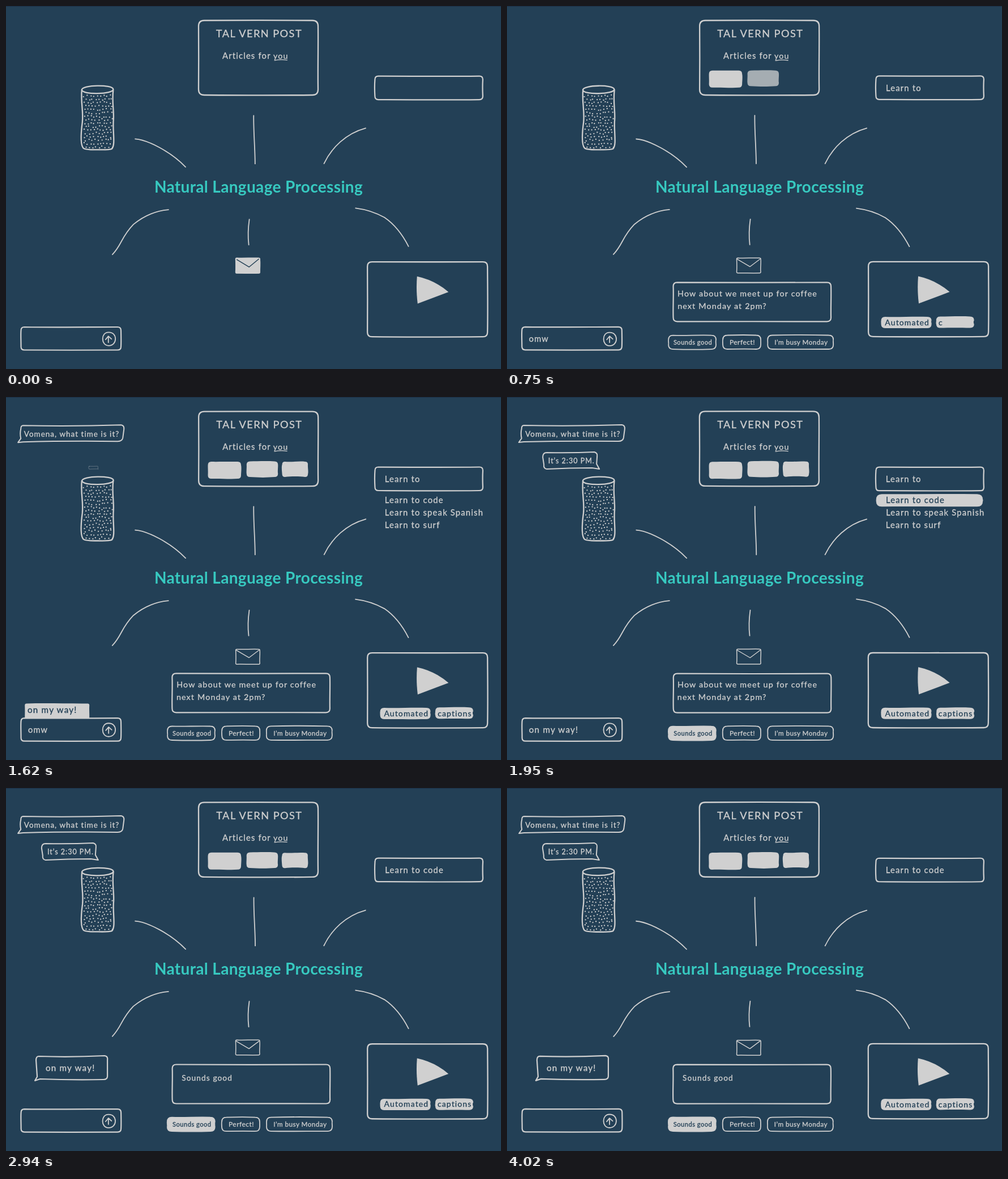
An HTML page for the animation above (4050 ms loop, 874 px wide and 640 px high).

```html
<!DOCTYPE html>
<html lang="en">
<head>
<meta charset="utf-8">
<title>Natural Language Processing</title>
<style>
  html, body { margin: 0; width: 100%; height: 100%; overflow: hidden; background: #234056; }
  svg { display: block; width: 874px; height: 640px; }
  text { font-family: Lato, "Open Sans", sans-serif; letter-spacing: .08em; white-space: pre; stroke-width: .3px; }
  .tight { letter-spacing: .04em; }
  .title { font-weight: 700; letter-spacing: .34px; stroke-width: 0; }
</style>
</head>
<body>
<svg id="stage" viewBox="0 0 874 640"></svg>
<script>
const LOOP = 4050, BOIL = 90;
const LIGHT = '#d0d0d0', DARK = '#234056', TEAL = '#37c9c0';
const stage = document.getElementById('stage');
const items = [];

let seed = 7;
const rnd = () => (seed = seed * 16807 % 2147483647) / 2147483647;
const off = a => (rnd() * 2 - 1) * a;
const noise = n => { const s = Math.sin(n * 12.9898) * 43758.5453; return s - Math.floor(s) - .5; };

// Times: from, to. Optional: fade (ms), grow [x, y, ms], type (ms per letter).
function add(tag, attrs, opt = {}) {
  const el = document.createElementNS('http://www.w3.org/2000/svg', tag);
  for (const k in attrs) el.setAttribute(k, attrs[k]);
  stage.append(el);
  items.push({ el, from: 0, to: LOOP, boil: .25, ...opt });
  return el;
}

const line = (d, width, opt, color = LIGHT) => add('path', {
  d, fill: 'none', stroke: color, 'stroke-width': width,
  'stroke-linecap': 'round', 'stroke-linejoin': 'round'
}, opt);
const fill = (d, opt) => add('path', { d, fill: LIGHT }, opt);

function text(x, y, size, str, opt = {}) {
  const color = opt.color || LIGHT;
  const el = add('text', {
    x, y, 'font-size': size, fill: color, stroke: color, class: opt.style || ''
  }, { ...opt, str });
  el.textContent = str;
  return el;
}

// Rounded box with slightly wavy sides
function box(x0, y0, x1, y1, r = 7, wave = .8) {
  const w = x1 - x0, h = y1 - y0, o = () => off(wave);
  return `M${x0 + r},${y0}` +
    `C${x0 + w * .35},${y0 + o()} ${x0 + w * .65},${y0 + o()} ${x1 - r},${y0}` +
    `Q${x1},${y0} ${x1},${y0 + r}` +
    `C${x1 + o()},${y0 + h * .35} ${x1 + o()},${y0 + h * .65} ${x1},${y1 - r}` +
    `Q${x1},${y1} ${x1 - r},${y1}` +
    `C${x0 + w * .65},${y1 + o()} ${x0 + w * .35},${y1 + o()} ${x0 + r},${y1}` +
    `Q${x0},${y1} ${x0},${y1 - r}` +
    `C${x0 + o()},${y0 + h * .65} ${x0 + o()},${y0 + h * .35} ${x0},${y0 + r}` +
    `Q${x0},${y0} ${x0 + r},${y0}Z`;
}

add('rect', { width: 874, height: 1, fill: '#1b2f48' }, { boil: 0 });

// Centre and connectors
text(446, 328.5, 28, 'Natural Language Processing', { color: TEAL, style: 'title', boil: 0 })
  .setAttribute('text-anchor', 'middle');
[
  'M228,234.5C250,236 291,257 317,284',
  'M437.5,193C437,220 440,250 440,278',
  'M561.5,278C575,250 600,225 635,215.5',
  'M188,438C205,420 203,408 225,385Q253,362 287,359',
  'M429.5,376Q426,400 428.5,421',
  'M617,356.5Q645,360 668,373Q693,390 710.5,424'
].forEach(d => line(d, 1.8));

// Smart speaker
line('M134,148C132,170 137,185 135,205C133,220 131,245 137,251Q141,254 163,253.5' +
  'Q182,254 187,252C194,245 188,220 190,200C191,185 187,170 189.5,148', 2.3);
line('M134,148C134,139 189,138 189.5,147C190,156 134,157 134,148Z', 2.3);
let dots = '';
for (let row = 0; row < 16; row++)
  for (let col = 0; col < 9; col++) {
    const x = 138 + col * 5.7 + row % 2 * 2.8 + off(1.5), y = 158.5 + row * 6 + off(1.8);
    dots += `M${x},${y}h.01`;
  }
line(dots, 2.3);

line('M30,50Q115,52 203,49Q209,50 208,57L206,72Q205,78 197,78Q110,77 30,79L21,80L26,73Q24,64 26,56Q26,50 30,50Z',
  2, { from: 870, grow: [21, 80, 180] });
text(32, 70, 13.4, 'Vomena, what time is it?', { from: 1020 });
line('M70,98Q112,99 154,97Q160,99 159,104L158,118L163,127L150,125Q110,125 70,127Q64,126 65,119L63,106Q63,98 70,98Z',
  2, { from: 1590, grow: [163, 127, 180] });
text(73, 117, 12.5, 'It\u2019s 2:30 PM.', { from: 1740 });

// News page
line(box(340, 25.5, 551, 157, 10), 2.3);
text(371, 55, 18.2, 'TAL VERN POST');
text(382, 93, 14.8, 'Articles for');
text(472, 93, 14.2, 'you');
line('M474,96Q485,94 496,95.5', 1.3);
fill(box(356.5, 114, 415, 144, 6, 1.5), { from: 360, fade: 200 });
fill(box(424.5, 113.5, 480, 141, 6, 1.5), { from: 600, fade: 200 });
fill(box(487.5, 114, 533, 141, 5, 1.5), { from: 840, fade: 200 });

// Search field
line(box(651.5, 123.5, 842, 165, 6), 2.2);
text(669, 150, 14.8, 'Learn to', { from: 120, to: 2250, type: 60 });
text(669, 150, 14.8, 'Learn to code', { from: 2250 });
fill(box(651.5, 171, 840, 193, 10), { from: 1680, to: 2250 });
text(669, 187, 14.8, 'Learn to code', { from: 960, to: 1680 });
text(669, 187, 14.8, 'Learn to code', { from: 1680, to: 2250, color: DARK });
text(669, 209, 14.8, 'Learn to speak Spanish', { from: 960, to: 2250 });
text(669, 231, 14.8, 'Learn to surf', { from: 960, to: 2250 });

// Message field
line(box(26.5, 566, 203, 606.5, 6), 2.2);
line('M181,575.5C197,575 197,599 181,599C167,599 167,575 181,575.5Z', 1.8);
line('M181,593V582.5M176,588L181,582L186.5,587', 1.8);
text(39, 592, 14.5, 'omw', { from: 300, to: 1680, type: 100 });
fill(box(33, 540.5, 147, 567, 3, 1), { from: 960, to: 1680 });
text(38, 557, 15.2, 'on my way!', { from: 960, to: 1680, color: DARK });
text(39, 592, 15.2, 'on my way!', { from: 1680, to: 2400 });
line('M58,473Q115,475 174,472Q180,473 179,479L179,508Q179,514 172,514Q115,515 60,513L51,516L55,509L53,480Q53,473 58,473Z',
  2.2, { from: 2490, grow: [51, 516, 210] });
text(70, 499, 15.2, 'on my way!', { from: 2670 });

// Mail
const flap = 'M407.5,447L429,460L446,446';
line(box(405.5, 444.5, 448, 471, 2, 1), 1.5);
line('M406,446L429,459.5L447,446', 1.4, { from: 300 });
fill(box(405, 444, 449, 471.5, 2, 1), { to: 300 });
line(flap, 1.5, { to: 300 }, DARK);
line(box(293.5, 487.5, 572, 556.5, 7), 2.2, { from: 420 });
text(301, 512, 14.3, 'How about we meet up for coffee', { from: 420, to: 2250 });
text(301, 534, 14.3, 'next Monday at 2pm?', { from: 420, to: 2250 });
text(310, 516, 13.7, 'Sounds good', { from: 2250 });
[[285, 369, 294, 11.2, 'Sounds good'], [381, 448, 393, 12, 'Perfect!'], [460, 576, 472, 11.7, 'I\u2019m busy Monday']]
  .forEach(([x0, x1, x, size, str], i) => {
    const d = box(x0, 580.5, x1, 605, 8);
    line(d, 1.8, { from: 570 });
    if (!i) fill(d, { from: 1680 });
    text(x, 597, size, str, { from: 570, to: i ? LOOP : 1680, style: 'tight' });
    if (!i) text(x, 597, size, str, { from: 1680, color: DARK, style: 'tight' });
  });

// Video with captions
line(box(638, 451, 850, 583, 8), 2.3);
fill('M726,476.5Q757,483 781.5,504L727,524.5Q724,500 726,476.5Z');
fill(box(660.5, 548, 749.5, 568, 7, 1.5), { from: 90 });
text(667.5, 562.5, 14, 'Automated', { from: 120, type: 60, color: DARK });
fill(box(758, 547.5, 825, 567.5, 7, 1.5), { from: 690 });
text(762, 562.5, 14, 'captions', { from: 690, type: 55, color: DARK });

function draw(t) {
  const step = Math.floor(t / BOIL);
  items.forEach((it, i) => {
    const { el, from, to, boil, fade, grow, type, str } = it;
    const age = t - from, on = age >= 0 && t < to;
    el.setAttribute('visibility', on ? 'visible' : 'hidden');
    if (!on) return;
    if (fade) el.setAttribute('opacity', Math.min(1, age / fade));
    if (type) el.textContent = str.slice(0, Math.floor(age / type));
    const k = step * 71 + i * 3.7;
    let move = `translate(${noise(k) * 2 * boil},${noise(k + 1.3) * 2 * boil})`;
    if (grow) {
      const [x, y, ms] = grow, s = Math.max(.02, Math.min(1, age / ms));
      move += `translate(${x},${y})scale(${s})translate(${-x},${-y})`;
    }
    el.setAttribute('transform', move);
  });
}

function frame() {
  draw(performance.now() % LOOP);
  requestAnimationFrame(frame);
}
frame();
</script>
</body>
</html>
```
